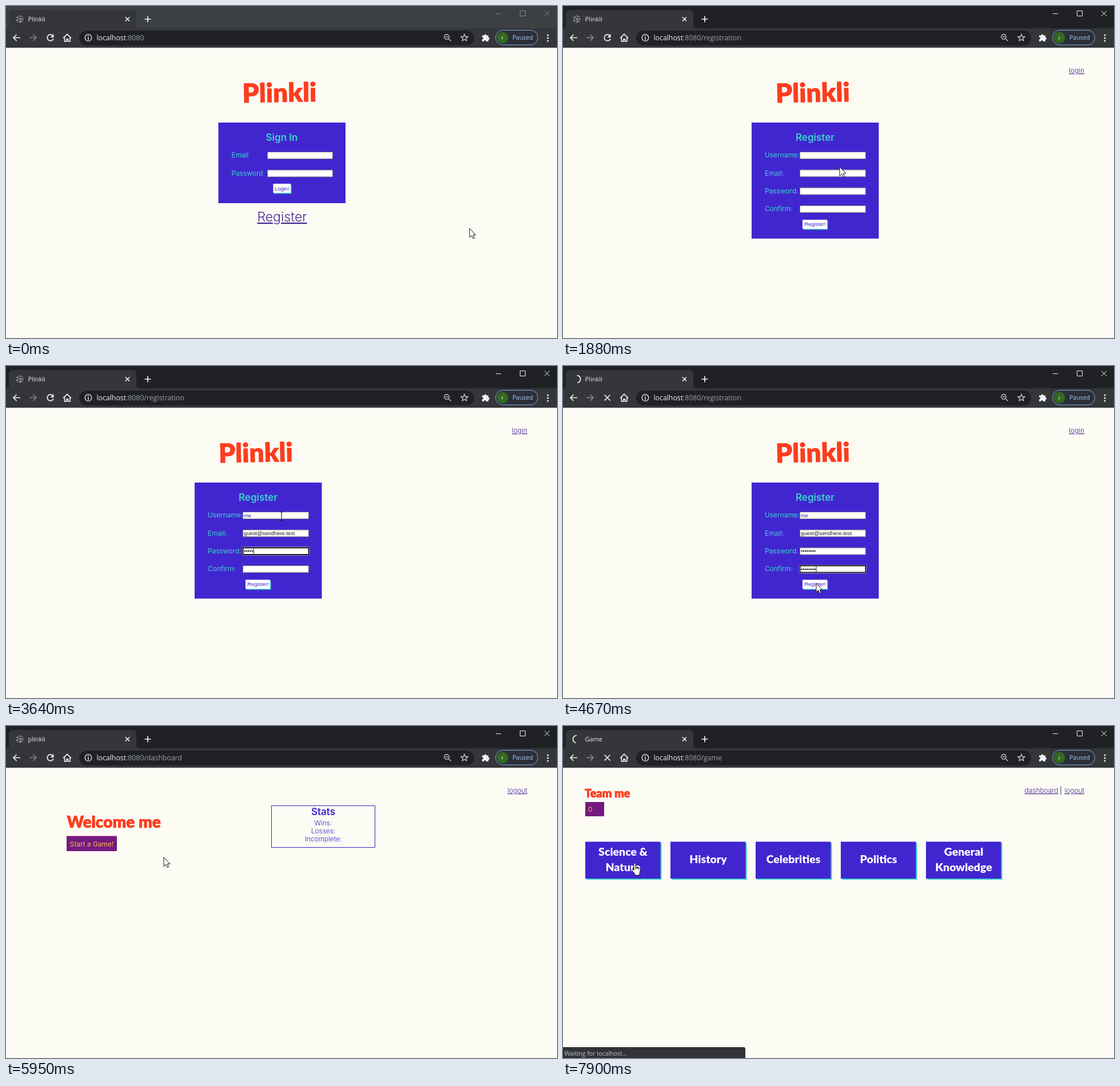
An HTML page that plays this animation: 964x581 px, repeating every 8000 ms.

```html
<!DOCTYPE html>
<html lang="en">
<head>
<meta charset="utf-8">
<title>Quiz walkthrough</title>
<style>
  html, body { margin: 0; width: 100%; height: 100%; overflow: hidden; background: #fcfbf4; }
  svg { display: block; width: 964px; height: 581px; }
  .ui { font-family: "Open Sans", sans-serif; }
  .page { font: 11.9px Inter, sans-serif; }
  .hand { font-family: Lato, sans-serif; font-weight: 900; stroke-linejoin: round; }
  .red { fill: #fc3d1e; stroke: #fc3d1e; stroke-width: .7; }
  .blue { fill: #4126d0; }
  .teal { fill: #3bd4cb; }
  .plum { fill: #731a80; }
  .gold { fill: #ffb84a; }
  .head { font-size: 17px; font-weight: 600; }
  .mid { text-anchor: middle; }
  .link { fill: #45288f; font-weight: 300; text-decoration: underline; }
  .small { font: 9.4px "Liberation Sans", Arial, sans-serif; }
  .field { fill: #fff; stroke: #77747f; }
  .icon { fill: none; stroke: #f1f3f4; stroke-width: 1.7; }
  .soft { stroke: #c4c7cb; stroke-width: 1.4; }
</style>
</head>
<body>
<svg viewBox="0 0 964 581">
  <rect width="964" height="581" fill="#fcfbf4"/>

  <g class="page">
    <g id="login">
      <use href="#brand" x="41.5"/>
      <rect x="371.5" y="204" width="222.5" height="141" class="blue"/>
      <text x="482.5" y="236" class="teal head mid">Sign In</text>
      <g class="teal"><text x="394.5" y="265">Email</text><text x="394.5" y="297">Password</text></g>
      <rect x="457.5" y="255.5" width="114" height="12" class="field"/>
      <rect x="457.5" y="287" width="114" height="12" class="field"/>
      <rect x="469" y="312.5" width="30.5" height="16" class="teal"/>
      <rect x="467.5" y="311" width="30.5" height="16" fill="#fff"/>
      <text x="482.8" y="322.5" class="small blue mid">Login!</text>
      <text x="483" y="377" class="link mid" font-size="23">Register</text>
    </g>

    <g id="register">
      <text x="912" y="117" class="link" text-anchor="end">login</text>
      <g id="brand"><text class="hand red" x="372" y="168" font-size="46" transform="rotate(-1 440 150)">Plinkli</text></g>
      <rect x="330" y="204" width="222.5" height="203" class="blue"/>
      <text x="441" y="236" class="teal head mid">Register</text>
      <g id="form"></g>
      <rect id="caret" width="1" height="9" fill="#111"/>
      <rect x="420.5" y="375.5" width="43" height="16" class="teal"/>
      <rect x="419" y="374" width="43" height="16" fill="#fff"/>
      <text x="441" y="385.3" class="small blue mid">Register!</text>
    </g>

    <g id="dashboard">
      <text x="912" y="117" class="link" text-anchor="end">logout</text>
      <text x="106.5" y="178" class="hand red" font-size="28">Welcome me</text>
      <rect x="106" y="192" width="88" height="27" rx="1" class="plum"/>
      <path d="M106 192.5h88" stroke="#e08aa8"/>
      <text x="150" y="210.5" class="gold mid">Start a Game!</text>
      <rect x="464.5" y="139.5" width="181" height="73" fill="none" stroke="#4126d0"/>
      <g class="blue mid">
        <text x="555" y="156" class="head">Stats</text>
        <g font-weight="300"><text x="555" y="174">Wins:</text><text x="555" y="188">Losses:</text><text x="555" y="202">Incomplete:</text></g>
      </g>
    </g>

    <g id="game">
      <text x="866.5" y="117" class="link" text-anchor="end">dashboard</text>
      <text x="871" y="117" class="mid" fill="#222">|</text>
      <text x="912" y="117" class="link" text-anchor="end">logout</text>
      <text x="38" y="125" class="hand red" font-size="19.8">Team me</text>
      <rect x="39" y="133" width="33" height="25" class="plum"/>
      <text x="44" y="150" class="gold">0</text>
      <g id="topics" class="hand mid" font-size="19.5"></g>
    </g>
  </g>

  <g class="ui">
    <rect id="strip" width="964" height="39"/>
    <path d="M0 39Q5 39 5 33V15Q5 7 13 7H220Q228 7 228 15V33Q228 39 234 39H964V73H0Z" fill="#35363a"/>
    <rect x="128" y="43" width="691" height="26" rx="13" fill="#202124"/>
    <text id="tab" x="38.5" y="27" font-size="11" fill="#e8eaed"></text>
    <g id="globe">
      <circle cx="24" cy="23" r="6.5" fill="#7f8388"/>
      <path d="M18 22l4 1 1 3-2 2M22 17l1 3 4 0 2 2M26 25l3 0" fill="none" stroke="#35363a" stroke-width="2"/>
    </g>
    <circle id="core" cx="24.5" cy="23" r="4" fill="#686b70"/>
    <path id="spinner" d="M24 16.5A6.5 6.5 0 0 0 21 28.8" class="icon" stroke-linecap="round"/>
    <path d="M209 19.5l7 7m0-7l-7 7M248 17.5v11M242.5 23h11" class="icon" stroke-width="1.5"/>

    <g id="controls" fill="none">
      <path d="M857 13.5h9M899.5 8.5h9v9h-9zM942 8.5l9 9m0-9l-9 9"/>
    </g>

    <path d="M25 55.5H13M18.5 50l-5.5 5.5 5.5 5.5" class="icon"/>
    <path d="M41 55.5h12M47.500 50l5.500 5.500-5.500 5.500" class="icon" style="stroke:#85888c"/>
    <g id="reload"><path d="M82 52A5.500 5.500 0 1 0 83 57" class="icon"/><path d="M83.500 49v6h-6z" fill="#f1f3f4"/></g>
    <path id="stop" d="M72.500 50.500l10 10m0-10l-10 10" class="icon"/>
    <path d="M100 56l7-6.500 7 6.500M102.500 54.500V62h3.500v-4h2.500v4h3.500V54.500" class="icon" stroke-width="1.500"/>
    <circle cx="144" cy="55.500" r="5.800" class="icon" style="stroke-width:1.300"/>
    <path d="M144 54.500v4.500M144 51.700v1.500" class="icon" style="stroke-width:1.500"/>
    <text x="158.500" y="60" font-size="12.300" fill="#f1f3f4">localhost<tspan id="url" fill="#9aa0a6"></tspan></text>
    <g class="icon soft">
      <circle cx="771" cy="54" r="4.200"/>
      <path d="M774 57l4.500 4.500M769 54h4"/>
      <path d="M802 49.500l1.700 4 4.300.3-3.300 2.800 1 4.200-3.700-2.300-3.700 2.300 1-4.200-3.300-2.800 4.300-.3z"/>
    </g>
    <path d="M833 51.500h3.500a2 2 0 1 1 4 0h3.500v3.500a2 2 0 1 1 0 4v3h-4a2 2 0 0 0-4 0h-3v-3.500a2 2 0 0 0 0-4z" fill="#f1f3f4"/>
    <rect x="856.500" y="42.500" width="74" height="25.500" rx="12.750" fill="#2b2f38" stroke="#7fa9e8"/>
    <circle cx="868.500" cy="55.500" r="10" fill="#33691e"/>
    <text x="868.500" y="58.500" font-size="9" fill="#fff" class="mid">r</text>
    <text x="886" y="59.300" font-size="10.500" fill="#a9c7fa">Paused</text>
    <g fill="#f1f3f4"><circle cx="948" cy="51" r="1.500"/><circle cx="948" cy="56" r="1.500"/><circle cx="948" cy="61" r="1.500"/></g>

    <g id="status">
      <path d="M0 562H316Q319 562 319 565V581H0Z" fill="#323337"/>
      <text x="2.500" y="577" font-size="10.600" fill="#c3c6ca">Waiting for localhost...</text>
    </g>
  </g>

  <g id="pointer" stroke-linejoin="round">
    <path id="arrow" d="M0 0V16L3.700 12.500 6.200 18 8.600 17 6.200 11.700H10.800Z" fill="#fff" stroke="#111"/>
    <path id="beam" d="M-3-8Q0-8 0-6Q0-8 3-8M0-6V6M-3 8Q0 8 0 6Q0 8 3 8" fill="none" stroke="#222" stroke-width="1.200"/>
    <path id="palm" d="M-2 1.500C-2-.5 1-.5 1 1.500V7L7.500 8.500C9 9 9.500 10 9.300 11.500L8 18V21H-.5V18.500L-5.500 13C-6.500 11.500-4.500 10-3.300 11L-2 12.500ZM1 7v3.500M3.700 7.800v3M6.300 8.300v3" fill="#fff" stroke="#111"/>
  </g>
</svg>

<script>
const LOOP = 8000;
const $ = id => document.getElementById(id);
const show = (id, on) => { $(id).style.display = on ? "" : "none"; };
const within = (t, spans) => spans.some(([a, b]) => t >= a && t < b);
const latest = (t, list) => list.filter(item => item[0] <= t).pop();

const pages = [[0, "login"], [1500, "register"], [5120, "dashboard"], [6930, "game"]];
const tabs = [[0, "Plinkli"], [5120, "plinkli"], [6500, "localhost:8080/game"], [6930, "Game"]];
const urls = [[0, ":8080"], [1500, ":8080/registration"], [5120, ":8080/dashboard"], [6500, ":8080/game"]];
const loading = [[1000, 1500], [4640, 5120], [6300, 7030], [7600, LOOP]];
const waiting = [[1050, 1640], [4700, 5420], [6350, 7030], [7650, LOOP]];

const inputs = [
  { label: "Username:", text: "me", focus: 2000, start: 2050, pace: 100, color: "#332aa8" },
  { label: "Email:", text: "guest@sendhere.test", focus: 2600, start: 2620, pace: 32, color: "#222" },
  { label: "Password:", text: "•".repeat(8), focus: 3300, start: 3340, pace: 60, color: "#111" },
  { label: "Confirm:", text: "•".repeat(8), focus: 3880, start: 3900, pace: 45, color: "#111" }
];

// time, x, y, pointer shape
const track = [
  [0, 811, 389, "arrow"], [100, 811, 389, "arrow"], [330, 627, 303, "arrow"],
  [480, 546, 268, "beam"], [620, 527, 297, "beam"], [700, 510, 340, "arrow"],
  [840, 496, 371, "palm"], [1500, 496, 371, "palm"], [1680, 490, 335, "arrow"],
  [1950, 482, 263, "beam"], [4290, 482, 263, "beam"], [4340, 474, 280, "arrow"],
  [4560, 443, 380, "arrow"], [4700, 443, 380, "arrow"], [5090, 567, 345, "arrow"],
  [5200, 718, 321, "arrow"], [5420, 718, 321, "arrow"], [6100, 152, 204, "palm"],
  [6350, 152, 204, "palm"], [6400, 165, 225, "arrow"], [6700, 238, 294, "arrow"],
  [7130, 238, 294, "arrow"], [7400, 150, 255, "palm"], [7560, 126, 240, "palm"],
  [LOOP, 126, 240, "palm"]
];

$("form").innerHTML = inputs.map((f, i) => {
  const y = 255.5 + i * 31.3;
  return `<text class="teal" x="353" y="${y + 9.8}">${f.label}</text>
    <rect id="ring${i}" x="413" y="${y - 1.5}" width="118" height="15" rx="2" fill="#fff"/>
    <rect id="box${i}" class="field" x="414.5" y="${y}" width="115" height="12"/>
    <text id="value${i}" class="small" x="416" y="${y + 9.2}" fill="${f.color}"></text>`;
}).join("");

$("topics").innerHTML = [["Science &amp;", "Nature"], ["History"], ["Celebrities"], ["Politics"], ["General", "Knowledge"]]
  .map((lines, i) => {
    const x = 39 + i * 149;
    const words = lines.map((line, n) =>
      `<text x="${x + 66}" y="${240 + (n - (lines.length - 1) / 2) * 27}" fill="#fff">${line}</text>`);
    return `<rect x="${x + 2}" y="204.5" width="131.5" height="64.5" class="teal"/>
      <rect x="${x}" y="202.5" width="131.5" height="64.5" class="blue"/>${words.join("")}`;
  }).join("");

function drawForm(t) {
  const active = inputs.filter(f => t >= f.focus).length - 1;
  inputs.forEach((f, i) => {
    const count = Math.max(0, Math.floor((t - f.start) / f.pace));
    $("value" + i).textContent = f.text.slice(0, count);
    const box = $("box" + i);
    box.style.stroke = i === active ? "#101010" : "";
    box.style.strokeWidth = i === active ? 2 : 1;
    show("ring" + i, i === active);
  });
  show("caret", active >= 0);
  if (active >= 0) {
    $("caret").setAttribute("x", 416.3 + $("value" + active).getComputedTextLength());
    $("caret").setAttribute("y", 257 + active * 31.3);
  }
}

function drawPointer(t) {
  const from = latest(t, track);
  const to = track[track.indexOf(from) + 1] || from;
  const k = to === from ? 0 : (t - from[0]) / (to[0] - from[0]);
  const [x, y] = [1, 2].map(n => from[n] + (to[n] - from[n]) * k);
  $("pointer").setAttribute("transform", `translate(${x} ${y})`);
  ["arrow", "beam", "palm"].forEach(kind => show(kind, kind === from[3]));
}

function draw(now) {
  const t = now % LOOP;
  const page = latest(t, pages)[1];
  const busy = within(t, loading);
  // The brand is shared from the registration page, so pages hide by visibility.
  pages.forEach(([, id]) => { $(id).style.visibility = id === page ? "visible" : "hidden"; });
  $("brand").style.visibility = page === "login" || page === "register" ? "visible" : "hidden";
  $("brand").setAttribute("transform", page === "login" ? "translate(41.5 0)" : "");
  $("tab").textContent = latest(t, tabs)[1];
  $("url").textContent = latest(t, urls)[1];
  $("strip").setAttribute("fill", t < 940 ? "#3c4043" : "#202124");
  $("controls").setAttribute("stroke", t < 940 ? "#85888b" : "#f1f3f4");
  show("globe", !busy);
  show("reload", !busy);
  show("stop", busy);
  show("spinner", busy);
  show("core", within(t, [[6500, 6930]]));
  show("status", within(t, waiting));
  $("spinner").setAttribute("transform", `rotate(${-(t - 1400) / 590 * 360} 24 23)`);
  drawForm(t);
  drawPointer(t);
}

document.querySelector("#login use").remove();
const began = performance.now();
const tick = () => { draw(performance.now() - began); requestAnimationFrame(tick); };
tick();
</script>
</body>
</html>
```
